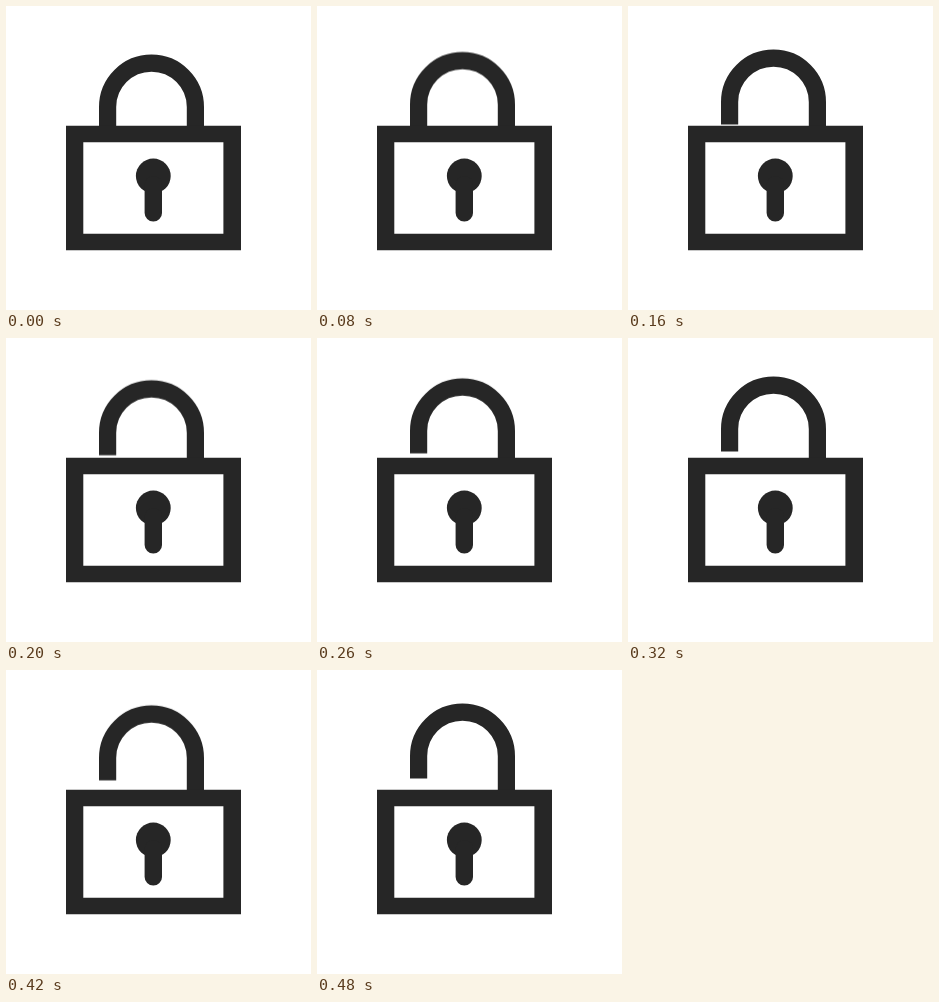
Write an HTML page that moves like this. It is 305x304 px and loops after 1200 ms.

```html
<!DOCTYPE html>
<html lang="en">
<head>
<meta charset="utf-8">
<title>Padlock</title>
<style>
  html, body { margin: 0; width: 100%; height: 100%; overflow: hidden; background: #fff; }
  svg { display: block; width: 305px; height: 304px; }
  .line { fill: none; stroke: #262626; stroke-width: 17.2; }
  .solid { fill: #262626; }
</style>
</head>
<body>
<svg viewBox="0 0 305 304">
  <path id="shackle" class="line" d="M101.6 123.5V101a43.9 43.9 0 0 1 87.8 0V135.2"/>
  <path class="solid" fill-rule="evenodd" d="M60 119.8H235V244.3H60ZM77.3 136.2V227.8H217.4V136.2Z"/>
  <circle class="solid" cx="147.3" cy="170" r="17.4"/>
  <rect class="solid" x="138.6" y="170" width="17.4" height="45.6" rx="8.7"/>
</svg>
<script>
  const loop = 1200, rise = 480, lift = 'translateY(-15px)';
  document.getElementById('shackle').animate([
    { offset: 0, transform: 'translateY(0px)', easing: 'steps(24, end)' },
    { offset: rise / loop, transform: lift },
    { offset: 1, transform: lift }
  ], { duration: loop, iterations: Infinity });
</script>
</body>
</html>
```
